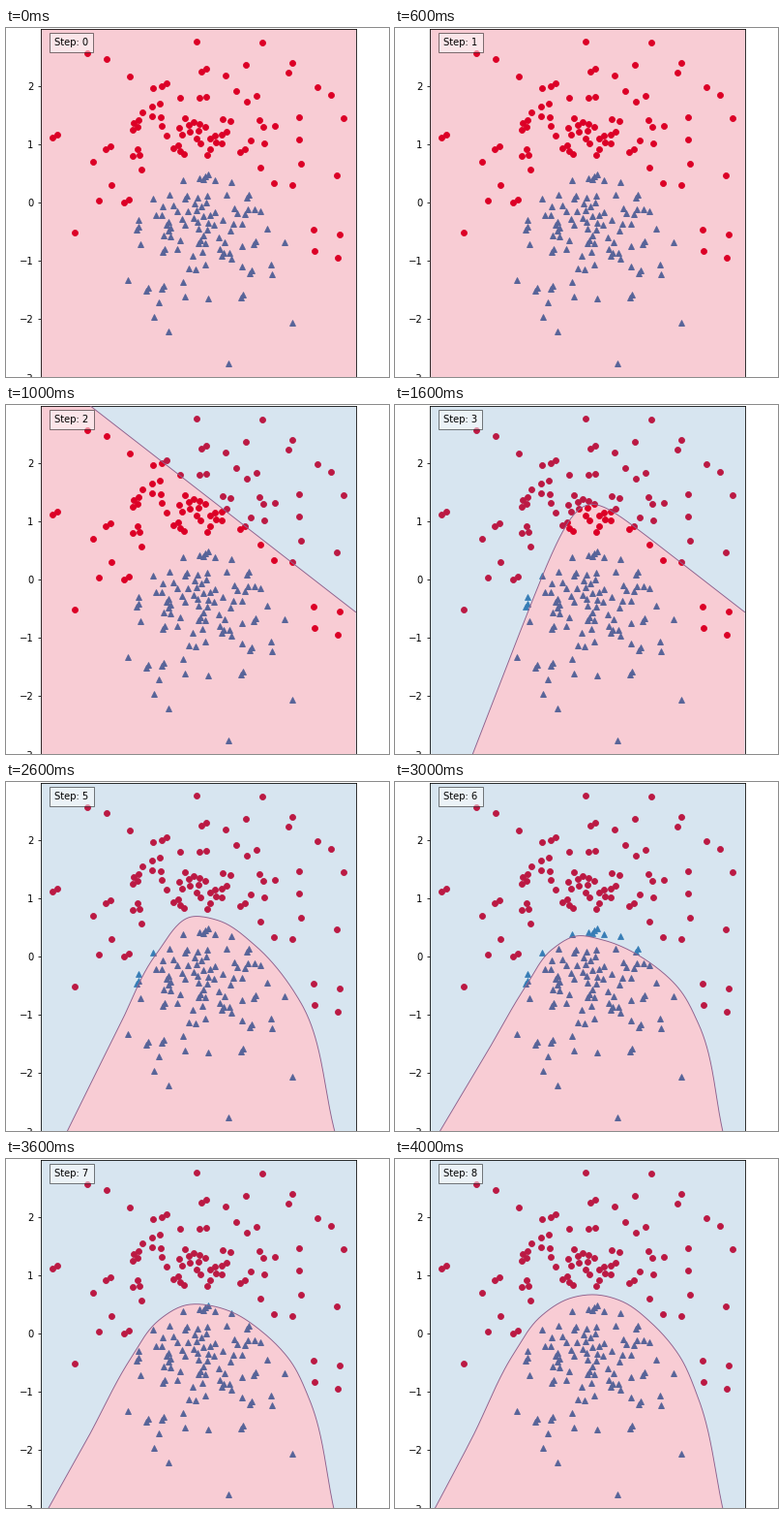
Write a matplotlib script that moves like this. It is 396x360 px and loops after 4.6 s.

```python
import numpy as np
import matplotlib.pyplot as plt
from matplotlib.animation import FuncAnimation
from matplotlib.colors import to_rgb

plt.rcParams["font.family"] = "DejaVu Sans"

W, H, DPI = 396, 360, 72
LEFT, RIGHT, TOP, BOTTOM = 35.5, 361.5, 0.5, 360.9
UNIT, ZERO = 60.2, 180
TICK_MS = 200
STEP_AT = np.repeat(np.arange(9), [3, 2] * 4 + [3])
RED, BLUE, TINT = "#dc0026", "#377db6", 0.2

# Landmarks of each class; the first ones come with a close neighbour.
CIRCLES = [
    (207, 42), (137, 95), (194, 97), (108, 122), (178, 121), (216, 111),
    (247, 125), (53, 110), (127, 177), (136, 102), (228, 107), (166, 57),
    (197, 14), (265, 15), (84, 26), (104, 32), (296, 36), (128, 50),
    (322, 61), (336, 69), (349, 93), (342, 152), (305, 140), (277, 160),
    (296, 162), (109, 162), (96, 178), (71, 211), (318, 208), (345, 213),
    (319, 230), (343, 237), (263, 144), (90, 138), (140, 146),
]
TRIANGLES = [
    (168, 200), (170, 206), (137, 205), (225, 232), (147, 268), (163, 266),
    (258, 220), (245, 275), (164, 228), (201, 219), (254, 250), (251, 172),
    (206, 153), (187, 173),
    (183, 157), (200, 155), (209, 151), (216, 157), (233, 159), (152, 176),
    (236, 186), (263, 189), (270, 207), (288, 221), (274, 244), (275, 254),
    (126, 260), (158, 283), (153, 298), (168, 313), (296, 304), (230, 346),
    (139, 223), (209, 279), (137, 198), (185, 277),
]


def cloud(landmarks, twins, offset, total, mean, spread, low, high, seed):
    """Landmarks, their neighbours, and a seeded filling of the dense part."""
    rng = np.random.default_rng(seed)
    pts = np.array(landmarks, float)
    pts = np.vstack([pts, pts[:twins] + offset])
    while len(pts) < total:
        p = rng.normal(mean, spread)
        free = np.hypot(*(pts - p).T).min() > 5.5
        if free and np.all(p > low) and np.all(p < high):
            pts = np.vstack([pts, p])
    return pts


def smooth(points, n=240):
    """Cubic Hermite curve through the points, by chord length."""
    p = np.array(points, float)
    s = np.r_[0, np.cumsum(np.hypot(*np.diff(p, axis=0).T))]
    m = np.gradient(p, s, axis=0)
    u = np.linspace(0, s[-1], n)
    k = np.clip(np.searchsorted(s, u, "right") - 1, 0, len(s) - 2)
    h = (s[k + 1] - s[k])[:, None]
    t = (u - s[k])[:, None] / h
    return (p[k] * (1 + 2 * t) * (1 - t) ** 2 + p[k + 1] * t * t * (3 - 2 * t)
            + h * t * (1 - t) * (m[k] * (1 - t) - m[k + 1] * t))


def mix(base, tint):
    return (1 - TINT) * np.array(to_rgb(base)) + TINT * np.array(to_rgb(tint))


BR, BL, TL, TR = (RIGHT, BOTTOM), (LEFT, BOTTOM), (LEFT, TOP), (RIGHT, TOP)

x = np.linspace(79, RIGHT, 240)
steep = BOTTOM - 2.58 * (x - 80)
slope = 0.775 * x - 66.6
diagonal = np.column_stack([x, slope])
bend = np.column_stack([x, 42 * np.logaddexp(steep / 42, slope / 42)])
tongue = smooth([(81, BOTTOM), (120, 259), (155, 169), (184, 113), (203, 105),
                 (228, 116), (262, 145), (284, 205), (264, 275),
                 (213, BOTTOM)])
wide = smooth([(63, BOTTOM), (118, 250), (155, 178), (192, 139), (220, 143),
               (258, 169), (305, 228), (340, BOTTOM)])
low = smooth([(46, BOTTOM), (95, 279), (135, 211), (162, 173), (187, 159),
              (215, 163), (263, 186), (295, 215), (314, 250), (339, BOTTOM)])
dome = smooth([(41, BOTTOM), (80, 287), (122, 202), (150, 163), (180, 144),
               (207, 140), (235, 147), (266, 170), (294, 203), (314, 248),
               (339, BOTTOM)])

# Boundary of each step and the corners that close the red region.
FULL = [TL, TR, BR, BL]
STEPS = [(None, FULL), (None, FULL), (diagonal, [BR, BL, TL]), (bend, [BR]),
         (tongue, []), (wide, []), (low, []), ((low + dome) / 2, []),
         (dome, [])]

fig = plt.figure(figsize=(W / DPI, H / DPI), dpi=DPI, facecolor="white")
ax = fig.add_axes([LEFT / W, 1 - BOTTOM / H,
                   (RIGHT - LEFT) / W, (BOTTOM - TOP) / H])
ax.set(xlim=(LEFT, RIGHT), ylim=(BOTTOM, TOP), facecolor=mix("white", BLUE))
ax.set_xticks([])
values = range(-3, 3)
ax.set_yticks([ZERO - UNIT * v for v in values],
              [str(v).replace("-", "\u2212") for v in values], fontsize=10)

region = plt.Polygon(FULL, fc=mix("white", RED), lw=0, zorder=2)
ax.add_patch(region)
edge, = ax.plot([], [], color="#8c5f8c", lw=0.9, zorder=4)

circles = cloud(CIRCLES, 12, (-5, 3), 91, (200, 97), (62, 28),
                (112, 32), (326, 134), seed=4)
triangles = cloud(TRIANGLES, 14, (-2, 3), 102, (204, 206), (32, 28),
                  (150, 168), (260, 268), seed=7)
inside = []
for pts, marker, color in ((circles, "o", RED), (triangles, "^", BLUE)):
    for tint, z in ((BLUE, 1), (RED, 3)):
        dots, = ax.plot(*pts.T, marker, color=mix(color, tint), ms=6, mew=0.8,
                        zorder=z)
        if tint == RED:
            inside.append(dots)

label = ax.text(50.3, 10, "", fontsize=10, va="top", zorder=6,
                bbox=dict(boxstyle="square,pad=0.5", fc="white", ec="black",
                          alpha=0.5))


def draw(i):
    step = STEP_AT[i]
    curve, corners = STEPS[step]
    if curve is None:
        region.set_xy(corners)
        edge.set_data([], [])
    else:
        region.set_xy(np.vstack([curve, corners]) if corners else curve)
        edge.set_data(*curve.T)
    for dots in inside:
        dots.set_clip_path(region)
    label.set_text(f"Step: {step}")
    return [region, edge, label, *inside]


anim = FuncAnimation(fig, draw, frames=len(STEP_AT), interval=TICK_MS,
                     repeat=True, repeat_delay=0, blit=False)
plt.show()
```
